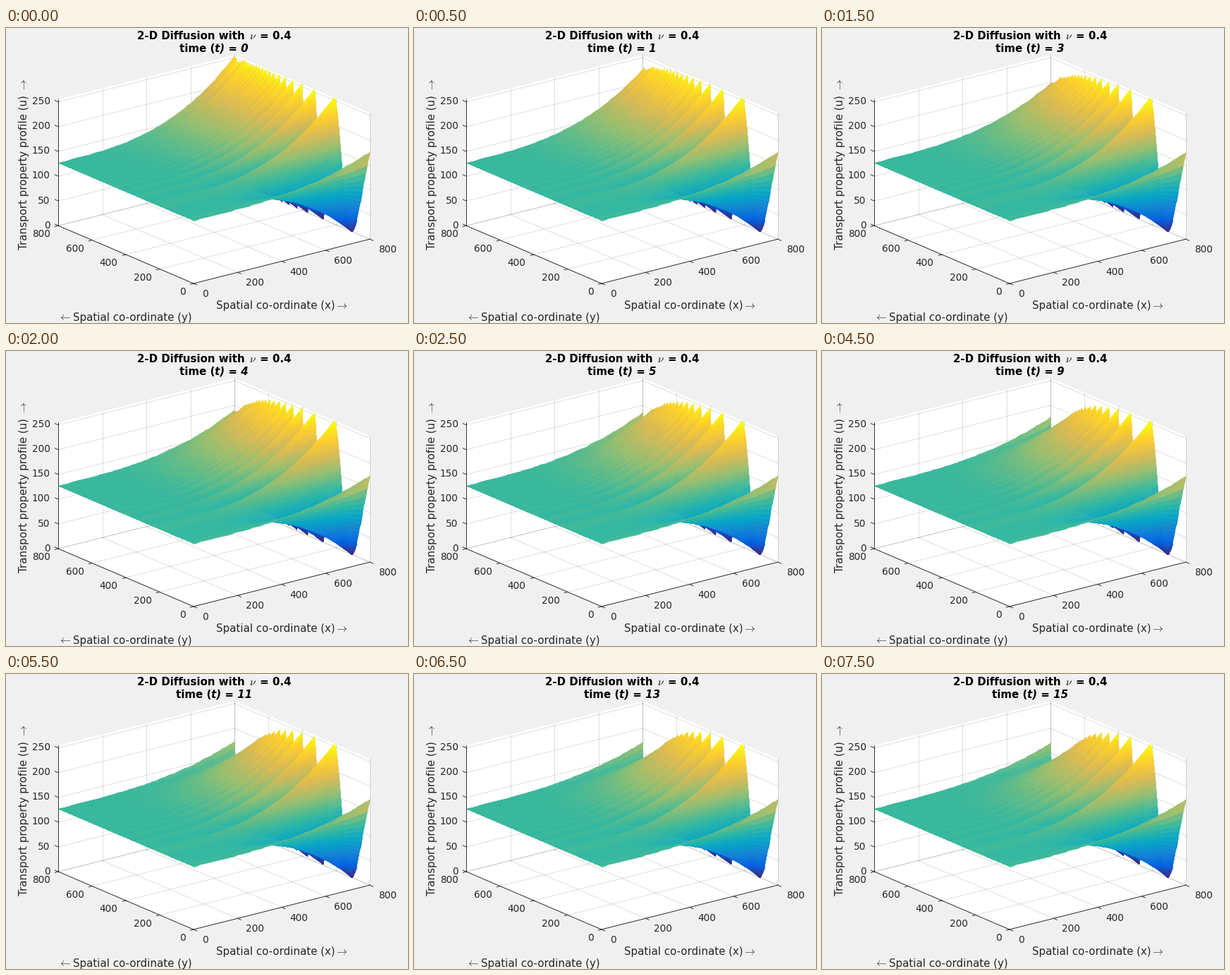
A matplotlib script that plays this animation: 570x418 px, repeating every 8000 ms.

```python
import numpy as np
import matplotlib.pyplot as plt
from matplotlib.animation import ArtistAnimation
from matplotlib.colors import LinearSegmentedColormap

W, H, DPI = 570, 418, 64
PX = 72 / DPI                      # points per pixel
SIZE, ZMAX, STEPS = 800, 255, 16
NU = 0.4
INK = (0.15, 0.15, 0.15)
COS, SIN = np.cos(np.radians(37.5)), np.sin(np.radians(37.5))
TILT = np.radians(30)

cmap = LinearSegmentedColormap.from_list("parula", [
    "#352a87", "#0363e1", "#1485d4", "#06a7c6", "#38b99e",
    "#92bf73", "#d9ba56", "#fcce2e", "#f9fb0e"], N=64)

plt.rcParams["font.family"] = "DejaVu Sans"
fig = plt.figure(figsize=(W / DPI, H / DPI), dpi=DPI, facecolor="#f0f0f0")
ax = fig.add_axes([0, 0, 1, 1])
ax.set_axis_off()


def project(x, y, z):
    """Orthographic view of the data box, in pixels."""
    x, y, z = x / SIZE, y / SIZE, z / ZMAX
    right = COS * x - SIN * y
    up = np.sin(TILT) * (SIN * x + COS * y) + np.cos(TILT) * z
    return 265.4 + 315 * right, 361.5 - 206.5 * up


def line(p, q, **style):
    (x0, y0), (x1, y1) = project(*p), project(*q)
    ax.plot([x0, x1], [y0, y1], **style)


def text(x, y, s, size=15, **style):
    style = {"color": INK, "va": "baseline", **style}
    return ax.text(x, y, s, fontsize=size * PX, **style)


def symbol(x, y, name, **style):
    text(x, y, rf"$\{name}$", math_fontfamily="cm", **style)


def tick(p, out, label, dx, dy, ha):
    line(p, np.add(p, out), color=INK, lw=0.9 * PX, zorder=4)
    x, y = project(*p)
    text(x + dx, y + dy, str(label), 13.6, ha=ha)


def draw_box():
    hull = [(0, SIZE, 0), (0, 0, 0), (SIZE, 0, 0),
            (SIZE, 0, ZMAX), (SIZE, SIZE, ZMAX), (0, SIZE, ZMAX)]
    ax.fill(*zip(*(project(*p) for p in hull)), color="white", lw=0, zorder=0)

    grid = dict(color=INK, alpha=0.15, lw=PX, zorder=1)
    for v in range(0, SIZE + 1, 200):
        line((v, 0, 0), (v, SIZE, 0), **grid)
        line((v, SIZE, 0), (v, SIZE, ZMAX), **grid)
        line((0, v, 0), (SIZE, v, 0), **grid)
        line((SIZE, v, 0), (SIZE, v, ZMAX), **grid)
        tick((v, 0, 0), (0, -20, 0), v, 12, 19, "left")
        tick((0, v, 0), (-15, 0, 0), v, -11.4, 16, "right")
    for v in range(0, ZMAX, 50):
        line((0, SIZE, v), (SIZE, SIZE, v), **grid)
        line((SIZE, 0, v), (SIZE, SIZE, v), **grid)
        tick((0, SIZE, v), (0, 20, 0), v, -11.4, 3.5, "right")

    for a, b in zip(hull, hull[1:3]):
        line(a, b, color=INK, lw=0.9 * PX, zorder=4)
    line(hull[0], hull[-1], color=INK, lw=0.9 * PX, zorder=4)


def draw_labels():
    text(297, 397.5, "Spatial co-ordinate (x)")
    symbol(466, 397.5, "rightarrow")
    symbol(73, 414, "leftarrow")
    text(94.5, 414, "Spatial co-ordinate (y)")
    upright = dict(rotation=90, rotation_mode="anchor")
    text(29.5, 313, "Transport property profile (u)", **upright)
    symbol(29.5, 89, "rightarrow", **upright)

    bold = dict(weight="bold", color="black")
    text(185.5, 15, "2-D Diffusion with", **bold)
    symbol(349.5, 15, "nu", ha="center", color="black")
    text(359, 15, "= 0.4", **bold)


def time_title(t):
    shift = -5.2 * (len(str(t)) - 1)
    bold = dict(weight="bold", color="black")
    return [text(245.3 + shift, 33, "time (", **bold),
            text(295.5 + shift, 33, f"t) = {t}", style="italic", **bold)]


def edge(t):
    """Level kept along the far side y = SIZE."""
    return 0.43 - 0.006 * t + 0.55 * np.exp(-t / 2.3)


def diffuse():
    """Yield the chirp along y after each implicit diffusion step."""
    n = SIZE + 1
    start, end = 2.741, 46.5 * np.pi
    w = np.sin(np.geomspace(start, end, n))
    m = (1 + 2 * NU) * np.eye(n) - NU * (np.eye(n, k=1) + np.eye(n, k=-1))
    m[0, 0] = 1 + NU
    m[-1] = np.eye(n)[-1]
    step = np.linalg.inv(m)
    for t in range(STEPS):
        yield t, w
        w = step @ np.append(w[:-1], edge(t + 1))


# Rows and columns run from far to near, so nearer cells cover farther ones.
ys = SIZE * np.linspace(1, 0, 600) ** 0.6
xs = np.linspace(SIZE, 0, 61)
contrast = (xs / SIZE) ** 3


def surface(w):
    profile = np.interp(ys, np.arange(SIZE + 1), w)
    u = 127.5 * (1 + np.outer(profile, contrast))
    sx, sy = project(xs[None, :], ys[:, None], u)
    return ax.pcolormesh(sx, sy, u[1:, :-1], cmap=cmap, vmin=0, vmax=ZMAX,
                         shading="flat", edgecolors="face",
                         linewidth=0.5 * PX, antialiased=True, zorder=3)


draw_box()
draw_labels()
frames = [[surface(w), *time_title(t)] for t, w in diffuse()]
ax.set_xlim(-0.5, W - 0.5)
ax.set_ylim(H - 0.5, -0.5)

anim = ArtistAnimation(fig, frames, interval=500, repeat=True, repeat_delay=0)
plt.show()
```
